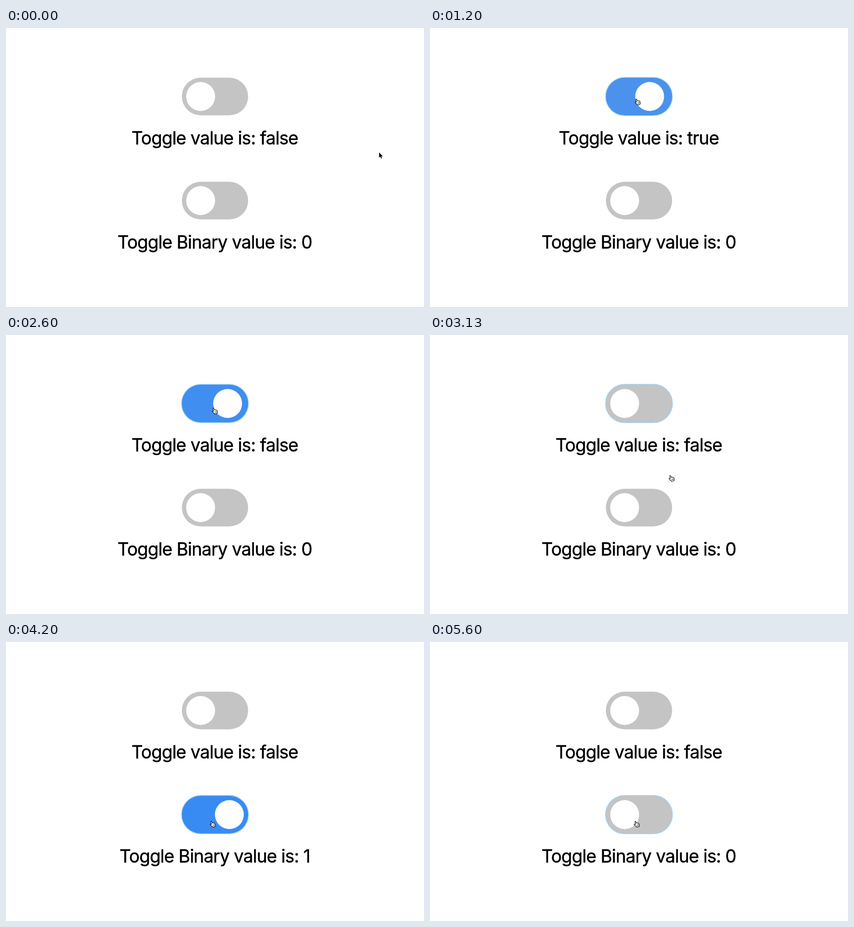
Recreate the animation shown at these times as an HTML page. Size 917x611 px, loop 6270 ms.

```html
<!DOCTYPE html>
<html lang="en">
<head>
<meta charset="utf-8">
<title>Toggle values</title>
<style>
  html, body { margin: 0; width: 100%; height: 100%; overflow: hidden; background: #fff; }
  svg { display: block; width: 100%; height: 100%; }
  text {
    font: 39px Inter, "Open Sans", sans-serif;
    font-optical-sizing: none;
    letter-spacing: -.025em;
    text-anchor: middle;
    fill: #000;
    stroke: #000;
    stroke-width: .5px;
  }
  .glow { fill: none; stroke: #9fd3f3; stroke-width: 3; filter: blur(.5px); }
  .knob { fill: #fff; }
</style>
</head>
<body>
<svg viewBox="0 0 917 611">
  <g id="plain"></g>
  <g id="binary"></g>
  <path id="arrow" d="M0 0V11.6L2.7 9.1L4.5 13.2L6.4 12.4L4.6 8.4H8.2Z" stroke="#fff" paint-order="stroke"/>
  <g id="hand" stroke="#000" stroke-linecap="round" stroke-linejoin="round">
    <path fill="#fff" stroke-width="1.1" d="M2 2.4q-.4-1.4.7-1.7q1-.2 1.5 1l1.3 3.2q.4-.9 1.5-.4q.8-.6 1.5.2q.9-.4 1.6.5q.9 0 1.2 1.1l.5 2.6q.2 1.9-.4 3.2l-5.6 1.4q-1-1.9-2.7-2.9q-2-1.1-2.6-2.6q-.2-1.3 1.1-1.2l1.8.9z"/>
    <path fill="none" stroke-width=".7" d="M6.3 8.2l.6 2.4M8 7.8l.6 2.4M9.7 7.4l.6 2.4"/>
  </g>
</svg>
<script>
const LOOP = 6270, TICK = 1000 / 15, FADE = 400, HAND_FROM = 300;
const OFF = [196, 196, 196], ON = [56, 139, 242];
const $ = id => document.getElementById(id);

const switches = [
  { id: 'plain', y: 150, label: 'Toggle value is: ', values: ['false', 'true'],
    on: 968, off: 2570, blur: 3770 },
  { id: 'binary', y: 378, label: 'Toggle Binary value is: ', values: ['0', '1'],
    on: 3770, off: 5167, blur: Infinity }
];

const start = { x: 818.5, y: 272.5 };
const glides = [
  { from: 70, to: 400, x: 353, y: 158 },
  { from: 400, to: 600, x: 449.5, y: 155 },
  { from: 1667, to: 1867, x: 452, y: 159.5 },
  { from: 2867, to: 3133, x: 524, y: 307 },
  { from: 3133, to: 3400, x: 496, y: 466 },
  { from: 3400, to: 3667, x: 447.5, y: 392 }
];

const mix = (a, b, k) => a + (b - a) * k;
const bezier = (a, b, s) => 3 * a * s * (1 - s) ** 2 + 3 * b * s * s * (1 - s) + s ** 3;

// The CSS "ease" curve, solved by bisection.
function ease(x) {
  if (x <= 0) return 0;
  if (x >= 1) return 1;
  let lo = 0, hi = 1;
  for (let i = 0; i < 24; i++) {
    const mid = (lo + hi) / 2;
    if (bezier(.25, .25, mid) < x) lo = mid; else hi = mid;
  }
  return bezier(.1, 1, lo);
}

const pulse = (t, on, off) => ease((t - on) / FADE) - ease((t - off) / FADE);

function pointerAt(t) {
  return glides.reduce((p, g) => {
    const k = ease((t - g.from) / (g.to - g.from));
    return { x: mix(p.x, g.x, k), y: mix(p.y, g.y, k) };
  }, start);
}

for (const s of switches) {
  const box = `x="385.8" y="${s.y - 41.2}" width="145.4" height="82.4" rx="41.2"`;
  const group = $(s.id);
  group.innerHTML = `<rect class="glow" ${box}/><rect class="track" ${box}/>
    <circle class="knob" cy="${s.y}" r="31.7"/><text x="458" y="${s.y + 105}"></text>`;
  for (const part of ['glow', 'track', 'knob']) s[part] = group.querySelector('.' + part);
  s.text = group.querySelector('text');
}

function drawSwitch(s, t) {
  const level = pulse(t, s.on, s.off);
  s.track.setAttribute('fill', `rgb(${OFF.map((c, i) => Math.round(mix(c, ON[i], level)))})`);
  s.knob.setAttribute('cx', mix(427, 490, level));
  s.glow.style.opacity = pulse(t, s.on, s.blur);
  s.text.textContent = s.label + s.values[+(t >= s.on && t < s.off)];
}

function draw(now) {
  const t = Math.floor((now % LOOP + 4) / TICK) * TICK;
  for (const s of switches) drawSwitch(s, t);
  const { x, y } = pointerAt(t);
  const shown = t < HAND_FROM ? 'arrow' : 'hand';
  for (const id of ['arrow', 'hand']) {
    $(id).setAttribute('transform', `translate(${x} ${y})`);
    $(id).style.display = id === shown ? '' : 'none';
  }
}

const begin = performance.now();
function frame() {
  draw(performance.now() - begin);
  requestAnimationFrame(frame);
}
frame();
</script>
</body>
</html>
```
